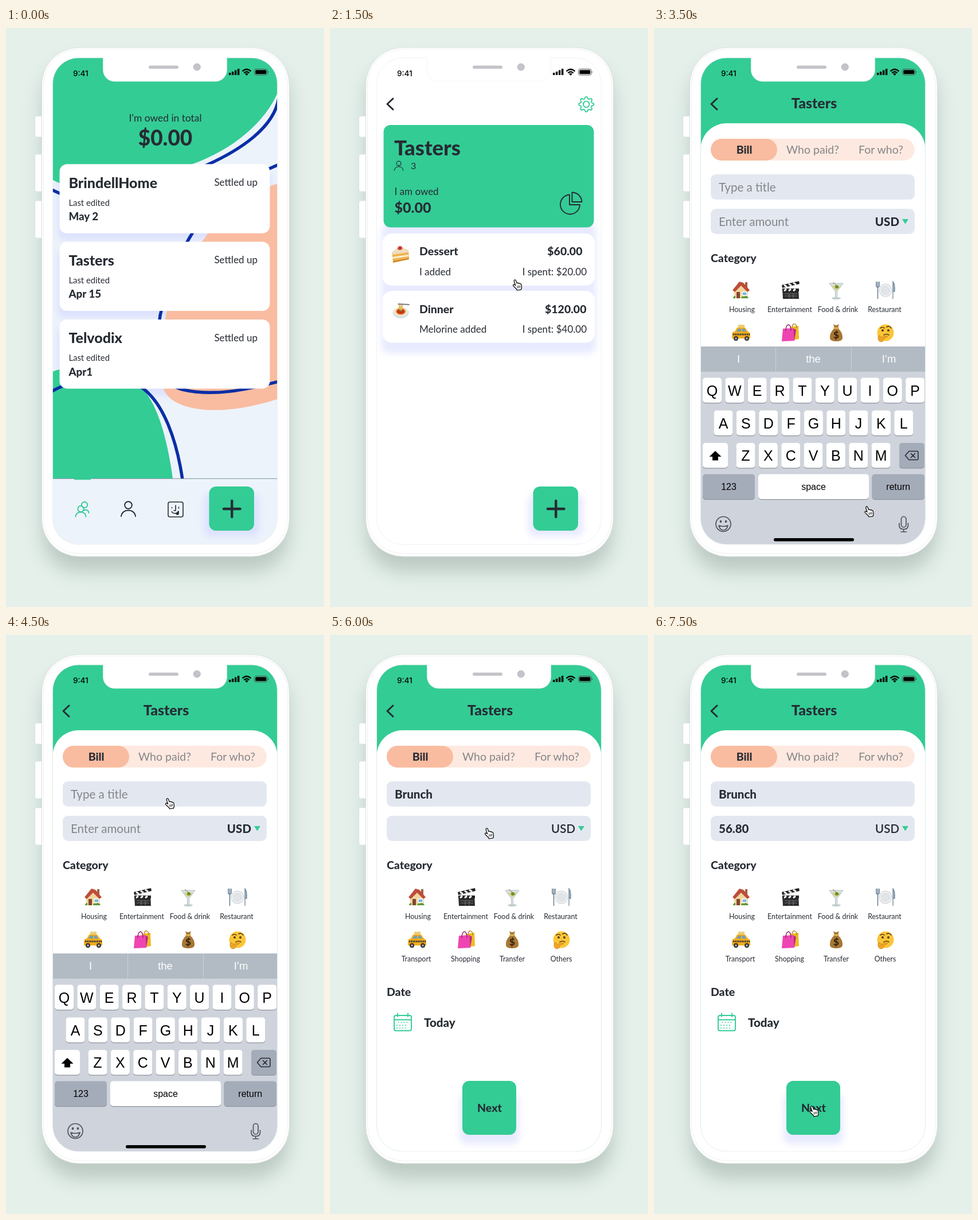
An HTML page for the animation above (8 s loop, 555 px wide and 1009 px high).

```html
<!DOCTYPE html>
<html lang="en">
<head>
<meta charset="utf-8">
<title>Shared bills</title>
<style>
html, body { margin: 0; width: 100%; height: 100%; overflow: hidden; background: #e5f0eb; }
svg { display: block; }
text { font-family: Lato, sans-serif; font-size: 17px; fill: #262b33; }
.b { font-weight: 800; }
.mid { text-anchor: middle; }
.end { text-anchor: end; }
.h { font-size: 25px; }
.m { font-size: 19.5px; }
.s { font-size: 14.8px; }
.label { font-size: 12.4px; text-anchor: middle; }
.field { font-size: 20.5px; }
.hint { fill: #858589; }
.keys text { font-family: "Liberation Sans", Arial, sans-serif; text-anchor: middle; fill: #000; }
.line { fill: none; stroke: #262b33; stroke-width: 1.9; stroke-linecap: round; stroke-linejoin: round; }
.green { stroke: #33cc95; }
.wave { fill: none; stroke: #0a2ea6; stroke-width: 5.5; }
.shade { fill: #bcc2ff; opacity: .34; filter: blur(6px); }
.body-shade { fill: #6f8379; opacity: .36; filter: blur(17px); }
</style>
</head>
<body>
<svg width="555" height="1009" viewBox="0 0 555 1009">
<defs>
  <clipPath id="screen"><rect x="81.500" y="52" width="392" height="848" rx="45"/></clipPath>
  <g id="person" class="line"><circle cx="0" cy="-6.500" r="6.300"/><path d="M-12.500 13C-11 -1 11 -1 12.500 13"/></g>
  <g id="back"><path class="line" style="stroke-width:3" d="M110 123L100 132.500L110 142"/></g>
  <g id="add"><rect class="shade" x="346" y="812" width="96" height="74" rx="12"/><rect x="354.500" y="799" width="78.500" height="77" rx="12" fill="#33cc95"/><path class="line" style="stroke-width:4.400" d="M380 838H408.500M394.300 824V852"/></g>

  <g id="cake"><path d="M-15 -3L-2 -13L14 -7L15 9L-13 15Z" fill="#f0b44c"/><path d="M-15 -3L-2 -13L14 -7L14 -3L-14 1Z" fill="#eddcc0"/><path d="M-14 5L14 1V4L-14 8Z" fill="#fbeed6"/><path d="M-13 12L15 7V9L-13 15Z" fill="#cf8a30"/><path d="M-5 -9Q-5 -14 0 -14Q4 -13 3 -9Q-1 -5 -5 -9Z" fill="#cf3a2c"/></g>
  <g id="pasta"><ellipse cy="4" rx="14" ry="10" fill="#d9dfe2"/><ellipse cy="2" rx="12" ry="8" fill="#f3f1e8"/><ellipse cy="2" rx="9.500" ry="6.500" fill="#e6b650"/><ellipse cy="2" rx="7" ry="4.600" fill="#c9311f"/><path d="M-3 -10L-1 1M0 -11V0M3 -10L1 1" stroke="#e5b44c" stroke-width="1.800"/><path d="M-5 -11L15 -10" stroke="#777c82" stroke-width="2"/><path d="M-2 1l3 -1" stroke="#4a9a3a" stroke-width="2"/></g>
  <g id="house"><path d="M7 -14h4v10h-4z" fill="#a45f43"/><path d="M-12 -2L0 -12L12 -2V14H-12Z" fill="#f0d5a0"/><path d="M-15 0L-3 -15L4 -13L15 0L11 3L0 -8L-11 3Z" fill="#bd4d38"/><path d="M-8 3h6v11h-6z" fill="#83472f"/><path d="M2 3h8v6H2z" fill="#75b7dd" stroke="#fff" stroke-width="1.300"/><path d="M0 14q1 -5 5 -3q5 -3 8 3zM-14 14q0 -4 4 -4v4z" fill="#5a9a3a"/></g>
  <g id="clapper"><path d="M-14 -3H14L15 15H-13Z" fill="#2b2b2d"/><path d="M-15 -9L15 -16L16 -11L-14 -4Z" fill="#222"/><path d="M-14 -3H15V2H-14Z" fill="#222"/><path d="M-11 -9l5 3M-3 -11l5 3M5 -13l5 3M-11 1l4 -3M-3 1l4 -3M5 1l4 -3" stroke="#fff" stroke-width="3"/><path d="M-10 6H12M-10 10H12M-2 6V14M5 6V14" stroke="#8b8b8d" stroke-width=".8"/></g>
  <g id="martini"><path d="M-12 -12H12L1.500 2V13H-1.500V2Z" fill="#dce4e4" stroke="#9caeb1" stroke-width=".8"/><path d="M-8 -8H8L0 1Z" fill="#d9d08a"/><ellipse cy="14" rx="8" ry="2" fill="#c1cccf"/><path d="M-6 -14L5 -4" stroke="#8a6c32"/><circle cx="1" cy="-6" r="3" fill="#6f9128"/></g>
  <g id="plate"><circle r="11.500" fill="#d8dce0"/><circle r="10" fill="#f0f1f3"/><circle r="7" fill="#e2e5e8" stroke="#c8cdd2" stroke-width=".7"/><path d="M-13.500 -15V15M-16 -15V-7Q-13.500 -3 -11 -7V-15" fill="none" stroke="#71889b" stroke-width="1.700"/><path d="M13 15V-15Q17 -10 16 2H13" fill="#9db0bf" stroke="#71889b" stroke-width="1.300"/></g>
  <g id="taxi"><path d="M-5 -14h11v5h-11z" fill="#e9cf76"/><path d="M-16 2Q-15 -2 -11 -2L-7 -9H7L12 -2Q16 -1 16 4V10H-16Z" fill="#f5ad1d"/><path d="M-8 -2L-5 -7H0V-2ZM2 -7H6L9 -2H2Z" fill="#6e9eb4"/><path d="M-14 3H15" stroke="#333" stroke-width="3" stroke-dasharray="2 1"/><circle cx="-9" cy="10" r="4" fill="#333"/><circle cx="10" cy="10" r="4" fill="#333"/><path d="M-9 10h0M10 10h0" stroke="#bbb" stroke-width="3.500" stroke-linecap="round"/></g>
  <g id="bags"><path d="M-1 -10L14 -12L15 11L2 13Z" fill="#efbb22"/><path d="M3 -9Q4 -17 8 -15Q11 -14 11 -8" fill="none" stroke="#a97b12" stroke-width="1.300"/><path d="M-13 -7L5 -8L7 14L-15 15Z" fill="#ee45b3"/><path d="M5 -8L10 -5L7 14Z" fill="#b92885"/><path d="M-8 -3Q-8 -14 -3 -14Q1 -13 1 -3" fill="none" stroke="#9c2473" stroke-width="1.500"/></g>
  <g id="money"><path d="M-5 -15Q0 -11 5 -15L3 -8Q12 0 11 10Q10 15 0 15Q-10 15 -11 10Q-12 0 -3 -8Z" fill="#a77735"/><path d="M-5 -8H5" stroke="#e4bc55" stroke-width="2.500"/><text y="10" class="b mid" style="font-size:17px;fill:#33230f">$</text></g>
  <g id="thinker"><circle r="14.500" fill="#fbc638"/><circle cx="-5" cy="-4" r="2" fill="#59391b"/><circle cx="5" cy="-4" r="2" fill="#59391b"/><path d="M-9 -8Q-5 -11 -2 -8M2 -10Q7 -13 10 -8M-3 4Q2 1 6 4" fill="none" stroke="#59391b" stroke-width="1.600" stroke-linecap="round"/><path d="M-13 9Q-13 4 -10 5L-8 8L3 5Q5 7 2 8L-3 10Q-2 15 -8 16Q-13 15 -13 9Z" fill="#eda525" stroke="#c77e19" stroke-width=".7"/></g>
</defs>

<rect class="body-shade" x="64" y="62" width="429" height="885" rx="62"/>
<g fill="#fff" stroke="#dce3e0">
  <rect x="50.500" y="153.500" width="16" height="36.500" rx="3"/>
  <rect x="50.500" y="220" width="16" height="65" rx="3"/>
  <rect x="50.500" y="301" width="16" height="65" rx="3"/>
</g>
<rect x="62.500" y="34" width="432" height="887" rx="65" fill="#fff" stroke="#dbe0de"/>
<rect x="65.500" y="37" width="426" height="879" rx="62" fill="#fff" stroke="#eef0f1"/>

<g clip-path="url(#screen)">
  <g id="home">
    <path d="M80 50H476V902H80Z" fill="#edf3fb"/>
    <g id="shades"></g>
    <path d="M80 50H474V113C454 160 400 212 320 239C225 285 130 292 80 264Z" fill="#33cc95"/>
    <path class="wave" d="M476 122C468 174 408 213 350 239C260 300 150 318 80 282"/>
    <path d="M474 271C415 290 375 322 347 366C310 410 288 465 279 501C270 545 264 595 275 629C287 663 360 683 476 646Z" fill="#f9bca0"/>
    <path class="wave" d="M476 238C402 268 348 318 320 366C292 414 278 462 269 501C262 558 264 620 308 630C362 643 421 630 476 616"/>
    <path d="M80 599C140 577 205 593 237 627C267 658 283 725 291 785H80Z" fill="#33cc95"/>
    <path class="wave" d="M80 633C130 606 195 600 239 628C275 655 298 718 308 787"/>
    <path d="M80 785.500H476V902H80Z" fill="#edf3fb"/>
    <path d="M80 785.300H476" stroke="#7f9397"/>
    <path d="M119 786H148" stroke="#33cc95" stroke-width="2.500"/>
    <text class="mid" x="278" y="163" style="font-size:17.400px">I’m owed in total</text>
    <text class="b mid" x="278" y="205" style="font-size:37px">$0.00</text>
    <g id="cards"></g>
    <g class="line green"><circle cx="137" cy="831" r="5.200"/><circle cx="130.500" cy="838" r="5.200"/><path d="M121.500 851.500C122 841 139 841 139.500 851.500M135.500 841C141 838 144 841 144.500 845"/></g>
    <use href="#person" x="213.500" y="838"/>
    <g class="line" style="stroke-width:1.600"><rect x="283" y="826" width="26" height="26" rx="3"/><path d="M296 832V841H293M289.500 835.500V836.500M301.500 835V837M289 843Q293 847 297 845.500"/><path d="M298 845L301 842V847Q299 849 297.500 847Z" fill="#262b33"/></g>
    <use href="#add"/>
  </g>

  <g id="group">
    <path d="M80 50H476V902H80Z" fill="#fff"/>
    <use href="#back"/>
    <path id="gear" class="line green" style="stroke-width:1.800"/>
    <circle cx="447.300" cy="133" r="5.300" class="line green" style="stroke-width:1.800"/>
    <rect class="shade" x="90" y="340" width="374" height="227" rx="14"/>
    <rect x="93.500" y="169" width="367" height="178.500" rx="12" fill="#33cc95"/>
    <g fill="#fff"><rect x="92" y="358" width="370" height="91" rx="16"/><rect x="92" y="458" width="370" height="90.500" rx="16"/></g>
    <text class="b" x="112" y="222" style="font-size:36.500px">Tasters</text>
    <use href="#person" transform="translate(120 240) scale(.62)"/>
    <text x="141" y="245.500" style="font-size:16px">3</text>
    <text x="112.500" y="291">I am owed</text>
    <text class="b h" x="112.500" y="322">$0.00</text>
    <path class="line" d="M418 290.500A17 17 0 1 0 436 308H418ZM422.500 286.500V303H439.500A17 17 0 0 0 422.500 286.500Z"/>
    <use href="#cake" x="123" y="394"/>
    <text class="b m" x="156" y="396">Dessert</text><text class="b m end" x="440.500" y="396">$60.00</text>
    <text x="156" y="431">I added</text><text class="end" x="448" y="431">I spent: $20.00</text>
    <use href="#pasta" x="123.500" y="492"/>
    <text class="b m" x="156" y="497">Dinner</text><text class="b m end" x="447.500" y="497">$120.00</text>
    <text x="156" y="531">Melorine added</text><text class="end" x="448" y="531">I spent: $40.00</text>
    <use href="#add"/>
  </g>

  <g id="form">
    <path d="M80 50H476V902H80Z" fill="#33cc95"/>
    <rect x="81.500" y="166" width="392" height="790" rx="45" fill="#fff"/>
    <use href="#back"/>
    <text class="b h mid" x="279.500" y="140">Tasters</text>
    <rect x="99" y="193" width="356" height="38" rx="19" fill="#fee9e0"/>
    <rect x="99" y="193" width="116" height="38" rx="19" fill="#f9bca0"/>
    <text class="b m mid" x="157.500" y="218.500">Bill</text>
    <text class="m mid hint" x="277" y="218.500">Who paid?</text>
    <text class="m mid hint" x="396" y="218.500">For who?</text>
    <g fill="#e3e8f0"><rect x="99" y="255" width="356" height="44" rx="9"/><rect x="99" y="315" width="356" height="44" rx="9"/></g>
    <text id="title" x="113" y="285"></text>
    <text id="amount" x="113" y="344.500"></text>
    <text id="currency" class="field end" x="428" y="344.500">USD</text>
    <path d="M433 333H444L438.500 341.500Z" fill="#33cc95"/>
    <text class="b m" x="99" y="407.500">Category</text>
    <g id="categories"></g>
    <text class="b m" x="99" y="628.500">Date</text>
    <g class="line green"><rect x="112" y="663" width="30" height="26.500" rx="3"/><path d="M112 670.500H142M118 659.500V665M136 659.500V665"/><path stroke-dasharray="0 5" d="M119.500 675H137M117 680H137M117 685H134"/></g>
    <text class="b" x="164" y="683" style="font-size:20.500px">Today</text>
    <rect class="shade" x="226" y="800" width="104" height="87" rx="12"/>
    <rect x="231" y="777" width="94" height="94" rx="12" fill="#33cc95"/>
    <text class="b m mid" x="278.500" y="831">Next</text>
  </g>

  <g id="keyboard" class="keys">
    <path d="M82 599H474V902H82Z" fill="#cfd4dc"/>
    <path d="M82 555H474V599H82Z" fill="#b2bbc4"/>
    <path d="M212.500 555V599M344.500 555V599" stroke="#c8cfd6"/>
    <g id="keys"></g>
    <path d="M107 737L117.500 747H112V753.500H102V747H96.500Z"/>
    <g class="line" style="stroke-width:1.600"><path d="M438.500 745L445 737.500H459Q461 737.500 461 739.500V750.500Q461 752.500 459 752.500H445ZM448.500 741.500L455.500 748.500M455.500 741.500L448.500 748.500"/></g>
    <g class="line" style="stroke:#4d535c;stroke-width:1.700"><circle cx="121" cy="864.500" r="13"/><path d="M113 867Q121 870 129 867Q127 875 121 875Q115 875 113 867Z"/><path style="stroke-width:3.500" d="M116.500 859.500V860.500M125.500 859.500V860.500"/><rect x="431.500" y="851.500" width="8.500" height="18.500" rx="4.250"/><path d="M428 863V867Q428 873.500 435.700 873.500Q443.500 873.500 443.500 867V863M435.700 873.500V878M431 878H440.500"/></g>
    <rect x="209" y="889" width="140" height="5.500" rx="2.700"/>
  </g>
</g>

<rect x="81.500" y="52" width="392" height="848" rx="45" fill="none" stroke="#ebecef" stroke-opacity=".75"/>
<path d="M169.500 51V73A20 20 0 0 0 189.500 93H365.500A20 20 0 0 0 385.500 73V51" fill="#fff" stroke="#f1f2f4" stroke-width=".7"/>
<rect x="249" y="65.500" width="52" height="5.500" rx="2.700" fill="#c4c3ca"/>
<circle cx="333.300" cy="68" r="6" fill="#c4c3ca" stroke="#b9b8c0"/>
<text x="117" y="83.500" style="font:500 13.500px Inter,sans-serif;fill:#000">9:41</text>
<path d="M389 78h3.400v4h-3.400zM394 76h3.400v6h-3.400zM399 73.500h3.400v8.500h-3.400zM404 71h3.400v11h-3.400z"/>
<path d="M412.500 75.500Q420 68.500 427.500 75.500M415.300 78.500Q420 74 424.700 78.500" fill="none" stroke="#000" stroke-width="2.200"/><path d="M417.200 80Q420 77.500 422.800 80L420 83Z"/>
<rect x="433.500" y="71.500" width="22.500" height="10.500" rx="3" fill="none" stroke="#555"/><rect x="435.300" y="73.200" width="19" height="7" rx="1.500"/><path d="M457.300 75q1.500 1.800 0 3.600z"/>

<g id="cursor" stroke="#000" stroke-linejoin="round">
  <path fill="#fff" stroke-width="1.200" d="M4.600 10.500L2.200 3.200Q2 .8 3.800 .8Q5 .8 5.500 2.300L6.900 6.600Q8.600 5.400 9.600 6.900Q11.600 6 12.300 7.700Q14.400 7 14.800 9.200L15.500 13Q15.600 15.500 14.600 17.800L7.600 19Q6.600 16.500 4.500 15L.8 11.400Q0 9.600 1.600 9.200Q2.800 9 4.600 10.500Z"/>
  <path d="M7.600 11.500L8.300 15.500M9.900 11L10.600 15M12.200 10.600L12.900 14.500" stroke-width=".9"/>
</g>
</svg>
<script>
const $ = id => document.getElementById(id);
const range = n => [...Array(n).keys()];

const cards = [['BrindellHome', 'May 2'], ['Tasters', 'Apr 15'], ['Telvodix', 'Apr1']];
const pitch = 135.3;
$('shades').innerHTML = cards.map((_, i) =>
  `<rect class="shade" x="90" y="${250 + i * pitch}" width="374" height="120" rx="13"/>`).join('');
$('cards').innerHTML = cards.map(([name, date], i) =>
  `<g transform="translate(0 ${i * pitch})">
    <rect x="93.500" y="237.300" width="367" height="120.500" rx="13" fill="#fff"/>
    <text class="b h" x="109.500" y="278.500">${name}</text><text class="end" x="439" y="275">Settled up</text>
    <text class="s" x="109.500" y="309.500">Last edited</text><text class="b" x="109.500" y="335" style="font-size:18.700px">${date}</text>
  </g>`).join('');

const categories = [
  ['house', 'Housing', 153.5], ['clapper', 'Entertainment', 237], ['martini', 'Food &amp; drink', 321], ['plate', 'Restaurant', 402.5],
  ['taxi', 'Transport', 150.5], ['bags', 'Shopping', 236.5], ['money', 'Transfer', 318], ['thinker', 'Others', 403.5]];
const columns = [152, 238, 318, 404];
$('categories').innerHTML = categories.map(([icon, label, x], i) => {
  const y = i < 4 ? 457 : 531;
  return `<use href="#${icon}" x="${columns[i % 4]}" y="${y}"/><text class="label" x="${x}" y="${y + 37.5}">${label}</text>`;
}).join('');

const key = (x, y, w, label = '', size = 25, fill = '#fff') =>
  `<rect x="${x}" y="${y + 1.3}" width="${w}" height="43.500" rx="5" fill="#8f949d"/>
   <rect x="${x}" y="${y}" width="${w}" height="43.500" rx="5" fill="${fill}"/>
   <text x="${x + w / 2}" y="${y + 21.8 + size * .37}" style="font-size:${size}px">${label}</text>`;
const row = (letters, x, y) => [...letters].map((c, i) => key(x + i * 39.35, y, 33, c)).join('');
const grey = '#a5acb9';
$('keys').innerHTML = row('QWERTYUIOP', 85, 609.5) + row('ASDFGHJKL', 104.5, 666.5) + row('ZXCVBNM', 143.5, 723) +
  key(85, 723, 44) + key(428, 723, 44, '', 25, grey) + key(85, 777.5, 91, '123', 16, grey) +
  key(182, 777.5, 193, 'space', 16) + key(380.5, 777.5, 91.5, 'return', 16, grey) +
  [['I', 147.5], ['the', 278], ['I’m', 410]].map(([word, x]) =>
    `<text x="${x}" y="583" style="font-size:18.500px;fill:#fff">${word}</text>`).join('');

$('gear').setAttribute('d', 'M' + range(32).map(i => {
  const angle = (i - .5) * Math.PI / 16, r = i % 4 < 2 ? 13 : 10;
  return `${447.3 + r * Math.cos(angle)} ${133 + r * Math.sin(angle)}`;
}).join('L') + 'Z');

// Start time, screen, cursor position, title, amount
const steps = [
  [0, 'home'],
  [500, 'home', [319, 438]],
  [1500, 'group', [319, 438]],
  [2500, 'group', [367.5, 833]],
  [3500, 'typing', [367.5, 833]],
  [4500, 'typing', [278, 284]],
  [5000, 'form', [278, 284], 'Brunch'],
  [6000, 'form', [270, 336], 'Brunch', ''],
  [6500, 'form', [270, 336], 'Brunch', '56.80'],
  [7500, 'form', [271.5, 820], 'Brunch', '56.80']];

const show = (id, on) => $(id).style.display = on ? '' : 'none';

function fill(id, value, hint) {
  $(id).textContent = value ?? hint;
  $(id).setAttribute('class', value == null ? 'field hint' : 'field b');
}

let current;
function draw(now) {
  const time = now % 8000;
  const step = steps.findLast(([start]) => start <= time);
  if (step !== current) {
    current = step;
    const [, screen, cursor, title, amount] = step;
    const typing = screen === 'typing';
    show('home', screen === 'home');
    show('group', screen === 'group');
    show('form', typing || screen === 'form');
    show('keyboard', typing);
    show('cursor', cursor);
    if (cursor) $('cursor').setAttribute('transform', `translate(${cursor})`);
    fill('title', title, 'Type a title');
    fill('amount', amount, 'Enter amount');
    $('currency').style.fontWeight = typing ? 800 : 600;
  }
  requestAnimationFrame(draw);
}
draw(0);
</script>
</body>
</html>
```
